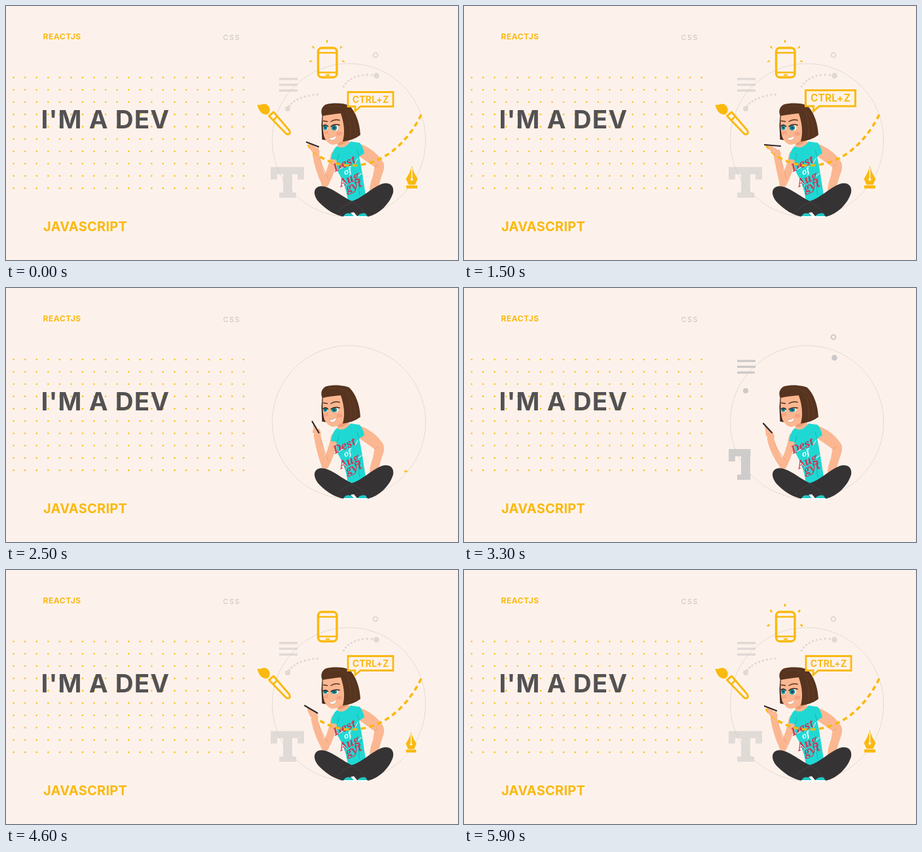
An HTML page that plays this animation: 690x388 px, repeating every 6 s.

```html
<!DOCTYPE html>
<html lang="en">
<head>
<meta charset="utf-8">
<title>I'm a dev</title>
<style>
html, body { margin: 0; width: 100%; height: 100%; overflow: hidden; background: #fdf2eb; }
svg { display: block; width: 100vw; height: 100vh; }
text { font-family: Inter, "Open Sans", sans-serif; font-weight: 700; }
.y { fill: #fab90f; }
.line { fill: none; stroke: #fab90f; stroke-width: 3.4; stroke-linejoin: round; }
.skin { fill: #fbb791; }
.limb { fill: none; stroke: #fbb791; stroke-linecap: round; stroke-linejoin: round; }
.thin { fill: none; stroke-linecap: round; }
.grey { fill: none; stroke: #cdc9c8; }
.script { font-family: "Noto Serif", serif; font-style: italic; font-size: 16.5px; fill: #cf3553; }
</style>
</head>
<body>
<svg viewBox="0 0 690 388" xmlns="http://www.w3.org/2000/svg">
  <defs><clipPath id="wipe"><rect id="wipeBox" x="400" y="240" width="60" height="60"/></clipPath></defs>
  <g id="grid" fill="#fac31c"></g>
  <text class="y" x="56.5" y="51" font-size="12" letter-spacing=".55">REACTJS</text>
  <text x="331.5" y="52" font-size="10.5" letter-spacing="1.8" fill="#c6c0bd" style="font-weight:400">CSS</text>
  <text x="53.5" y="187" font-size="38.5" letter-spacing="1.1" fill="#545153">I'M A DEV</text>
  <text class="y" x="57" y="343.7" font-size="20" letter-spacing=".25">JAVASCRIPT</text>

  <circle cx="523.5" cy="205" r="117" fill="none" stroke="#ccc5c2" stroke-width=".8" stroke-dasharray="2.5 1.2"/>

  <g id="greys">
    <circle id="ring" class="grey" cx="564" cy="75" r="3.4" stroke-width="2"/>
    <g id="bars" class="grey" stroke-width="3.4"></g>
    <g fill="#cdc9c8"><circle id="knobA" cx="430" cy="157"/><circle id="knobB" cx="565.5" cy="106.5"/></g>
    <g id="arcs" fill="#cdc9c8"></g>
    <path clip-path="url(#wipe)" fill="#cfcccc" d="M404 246H455V265H445V257H437V285H443V293H417V285H423V257H414V265H404Z"/>
  </g>

  <g id="phone">
    <rect class="line" x="476.500" y="64" width="28.5" height="45" rx="5.5"/>
    <path class="line" d="M477 71.5H504M477 101.5H504" style="stroke-width:2.4"/>
    <path class="line" d="M488 105.500H494" style="stroke-width:2.2"/>
  </g>
  <g id="rays" class="line"></g>

  <g id="brush">
    <path class="y" d="M383.5 150.5C389 153 391 148 397 150C403 153 405 160 400 165C394 168 386 163 383.5 150.5Z"/>
    <path class="line" d="M401.5 168L408.5 162L432.5 190Q435.5 197.5 428 195.5Z" style="stroke-width:3"/>
    <path class="line" d="M407 175L414.5 168.5" style="stroke-width:2.6"/>
  </g>

  <g id="nib">
    <path class="y" d="M619.5 244C622 253 625 259 628.5 264L624.5 273H614.5L610.5 264C614 259 617 253 619.5 244Z"/>
    <rect class="y" x="611" y="274" width="17" height="4.8"/>
    <path d="M619.5 247V264" stroke="#fdf2eb" stroke-width="1.6"/>
    <circle cx="619.5" cy="265" r="2" fill="#fdf2eb"/>
  </g>

  <g id="girl">
    <path class="skin" d="M541 211C556 216 568 226 576 239Q578.500 246 575.500 254Q570 268 567 286H555Q555 272 560 260L562.500 246L540 230Z"/>
    <path class="thin" stroke="#e99a74" stroke-width=".9" d="M563 246Q566 245 568 242"/>

    <path class="limb" stroke-width="11.500" d="M502 227Q497 252 487 271"/>
    <path id="forearm" class="limb" stroke-width="10.5"/>
    <path id="crease" class="thin" stroke="#e99a74" stroke-width=".8"/>

    <path class="skin" d="M505 200L520 198L526 212Q516 226 506 216Z"/>
    <path fill="#ea9d77" d="M506 207Q514 208 520 202L521 206Q514 214 507 212Z"/>
    <path fill="#20d8d3" d="M505 214Q515 221 526 207L540 209Q545 215 547 225L539 230C543 247 546 270 551 301H522C521 285 516 269 507 254C504 247 504 241 505 235L496 234Q498 220 505 214Z"/>
    <path class="thin" stroke="#14b5b4" stroke-width="1" d="M539 230Q537 223 536 220M543 258Q536 272 540 289M505 236Q508 231 508 226"/>
    <g text-anchor="middle">
      <text class="script" transform="translate(519 246) rotate(-24)">Dest</text>
      <text class="script" transform="translate(523 256) rotate(-24)" style="fill:#fff;font-size:12px">of</text>
      <text class="script" transform="translate(526 270) rotate(-24)">Aug</text>
      <text class="script" transform="translate(533 280) rotate(-24)">gyt</text>
    </g>
    <path class="thin" stroke="#fff" stroke-width="1" d="M508 250L515 246M533 240L537 233M515 268L520 273M537 260L543 256"/>

    <path fill="#363335" d="M528 298C512 291 493 273 479 275.500C468 278 469 290 478 300C489 311 502 320 517 322H552C570 318 586 302 591 285C593 273 584 268 573 272C556 279 543 294 528 298Z"/>
    <path class="thin" stroke="#454144" stroke-width="1" d="M528 299Q542 306 548 317M529 299Q512 306 506 315"/>
    <path fill="#20c9c7" d="M515 322Q518 315 526 317L533 322ZM535 322Q542 315 549 317L552 322Z"/>
    <path fill="#fff" d="M526 316L531 315L536 321H531ZM515 321H552V323H515Z"/>

    <path fill="#43261a" d="M483 162L481.500 182L482.500 204L490 205L489 178Z"/>
    <path class="skin" d="M484 163C483 178 483 192 486 201Q491 211 499 212C509 211 517 204 519 194L518 163Z"/>
    <path fill="#57341f" d="M483 168C479 160 483 153 488 150.500C499 147.500 515 148 524 152C534 162 540 178 541 197Q531 205 514 207C518 193 516 178 511 164C502 165 492 166 483 168Z"/>
    <path class="thin" stroke="#65402a" stroke-width=".9" d="M492 154Q509 151 519 158Q528 174 526 201M522 158Q533 172 534 198"/>
    <ellipse cx="509" cy="195" rx="4.500" ry="3" fill="#f58f77" opacity=".55"/>
    <ellipse cx="487" cy="194" rx="2.500" ry="2.500" fill="#f58f77" opacity=".45"/>
    <path class="thin" stroke="#58301f" stroke-width="1.500" d="M484.500 175.500L490.500 176.500M496 176.500Q502 172.500 509 174.500"/>
    <path class="thin" stroke="#e59373" stroke-width="1" d="M491 190Q489 195 492 195.500"/>
    <path fill="#fff" stroke="#d98770" stroke-width=".5" d="M493 201.500Q499 202 504.500 198Q503.500 205 498 205Q494.500 204.500 493 201.500Z"/>
    <g id="eyeballs">
      <ellipse cx="488" cy="185.500" rx="3.600" ry="4.300" fill="#fff"/>
      <ellipse cx="502" cy="186" rx="5.400" ry="4.600" fill="#fff"/>
      <ellipse cx="487.500" cy="185.500" rx="3.100" ry="4" fill="#1c8f98"/>
      <ellipse cx="501" cy="186" rx="4.300" ry="4.300" fill="#1c8f98"/>
      <circle cx="487.500" cy="185.500" r="1.500" fill="#174a56"/>
      <circle cx="501" cy="186" r="2" fill="#174a56"/>
    </g>
    <path id="lids" class="thin" stroke="#3a221b" stroke-width="1.500"/>
  </g>

  <path id="swing" class="line" stroke-dasharray="7.5 5.5" style="stroke-width:3.6"/>

  <path id="fingers" class="limb" stroke-width="4"/>
  <path id="pen" class="thin" stroke="#302a2c" stroke-width="2.2"/>

  <g id="bubble">
    <path d="M522 131.500H591V153.500H541L533 160.500V153.500H522Z" fill="#fdf2eb" stroke="#fab90f" stroke-width="2.8"/>
    <text class="y" x="528.800" y="147.600" font-size="14" letter-spacing=".15">CTRL+Z</text>
  </g>
</svg>
<script>
const LOOP = 6000, STEP = 100;
const $ = id => document.getElementById(id);
const clamp = v => Math.max(0, Math.min(1, v));
const mix = (a, b, u) => a + (b - a) * u;
const smooth = u => u * u * (3 - 2 * u);
const backIn = u => 2.7 * u ** 3 - 1.7 * u * u;
const backOut = u => 1 - backIn(1 - u);
const put = (id, attrs) => { for (const k in attrs) $(id).setAttribute(k, attrs[k]); };
const visible = on => on ? "visible" : "hidden";

// Leaves at `out`, comes back at `enter`; the loop starts fully shown.
function shown(t, enter, inDur, out, outDur, back = true) {
  const leaving = t < out + outDur;
  const u = leaving ? clamp((t - out) / outDur) : clamp((t - enter) / inDur);
  if (leaving) return 1 - (back ? backIn(u) : smooth(u));
  return back ? backOut(u) : smooth(u);
}

function scale(id, s, x, y, turn = 0) {
  put(id, {
    transform: `translate(${x} ${y}) rotate(${turn}) scale(${s}) translate(${-x} ${-y})`,
    visibility: visible(s > 0.01)
  });
}

// time, pen tip x y, pen tail x y, hand x y
const POSES = [
  [0, 459, 208, 477, 215, 468, 214],
  [1500, 459, 212, 483, 214, 473, 217],
  [2500, 467.5, 204, 477.5, 221, 470, 213],
  [3300, 457, 207, 470, 221, 463, 218],
  [4200, 457, 206, 472, 221, 465, 216],
  [5100, 455, 209, 480, 215, 467, 215],
  [5900, 459, 208, 477, 215, 468, 214],
  [6000, 459, 208, 477, 215, 468, 214]
];
const EYES = [[0, 1], [1500, 1], [2500, .8], [3300, .75], [4200, .65], [4900, .75],
  [5000, .3], [5100, 0], [5200, .3], [5300, 1], [6000, 1]];

function keyed(keys, t) {
  const i = Math.max(1, keys.findIndex(k => k[0] > t));
  const a = keys[i - 1], b = keys[i];
  const u = smooth((t - a[0]) / (b[0] - a[0]));
  return a.slice(1).map((v, j) => mix(v, b[j + 1], u));
}

const bezier = (p, u) => [0, 1].map(i => {
  const v = 1 - u;
  return v ** 3 * p[0][i] + 3 * v * v * u * p[1][i] + 3 * v * u * u * p[2][i] + u ** 3 * p[3][i];
});

const ARCS = [
  [[430, 157], [437, 142], [460, 135], [482, 135]],
  [[513, 128], [520, 110], [540, 102], [566, 106]]
];
const SWING = [[460, 210], [479, 248], [578, 276], [634, 166]];

let dots = "";
for (let r = 0; r < 10; r++)
  for (let c = 0; c < 21; c++)
    dots += `<circle cx="${11.7 + c * 17.55}" cy="${109.2 + r * 18.8}" r="1.3"/>`;
$("grid").innerHTML = dots;

function drawGreys(t) {
  const part = (enter, out, back) => clamp(shown(t, enter, 450, out, 400, back));
  const ring = part(2800, 1900);
  put("ring", { r: 3.4 * ring, visibility: visible(ring > .01) });
  put("knobA", { r: 4 * part(2800, 1800) });
  put("knobB", { r: 4.4 * part(2800, 1800) });
  $("bars").innerHTML = [0, 1, 2].map(i => {
    const w = 28 * part(2750 + i * 80, 1600 + i * 80, false);
    return w > .1 ? `<path d="M417 ${111.5 + i * 8.8}h${w}"/>` : "";
  }).join("");
  const sweep = shown(t, 3350, 600, 1600, 500, false);
  $("arcs").innerHTML = ARCS.map((arc, k) => {
    let s = "";
    for (let i = 0; i <= 10; i++) {
      const u = i / 10;
      if ((k ? 1 - u : u) >= sweep) continue;
      const [x, y] = bezier(arc, u);
      s += `<circle cx="${x}" cy="${y}" r="1.7"/>`;
    }
    return s;
  }).join("");
  put("wipeBox", { width: 60 * shown(t, 2950, 600, 1700, 500, false) });
  put("greys", { opacity: t > 2500 ? mix(1, .6, clamp((t - 3500) / 500)) : .6 });
}

function drawRays(t) {
  put("rays", { visibility: visible(t >= 5800 || t < 1600) });
  const beat = Math.max(0, Math.sin((t - 5800) / 800 * 2 * Math.PI)) ** 3;
  const d = [[490, 54, -90], [469, 63, -130], [511.5, 63, -50], [465, 84.5, 150], [515, 84.5, 30]]
    .map(([x, y, deg]) => {
      const a = deg * Math.PI / 180, c = Math.cos(a), s = Math.sin(a);
      const at = r => `${x + c * r} ${y + s * r}`;
      return `M${at(beat - 2)}L${at(beat + 2)}`;
    }).join("");
  $("rays").innerHTML = `<path d="${d}" style="stroke-width:${2 + 2 * beat}"/>`;
}

function drawArm(t) {
  const [px, py, qx, qy, hx, hy] = keyed(POSES, t);
  put("forearm", { d: `M487 271Q${hx + 9} 250 ${hx + 5} ${hy + 12}` });
  put("crease", { d: `M492 264Q${hx + 16} 250 ${hx + 11} ${hy + 18}` });
  put("pen", { d: `M${px} ${py}L${qx} ${qy}` });
  const mx = mix(px, qx, .3), my = mix(py, qy, .3);
  put("fingers", {
    d: `M${hx + 6} ${hy + 11}L${hx + 3} ${hy + 3}L${mx} ${my + 2}` +
       `M${hx + 7} ${hy + 8}L${hx} ${hy + 7}L${mx + 1} ${my + 5}M${hx + 9} ${hy + 9}L${hx + 7} ${hy + 4}`
  });
}

function drawEyes(t) {
  const [open] = keyed(EYES, t);
  put("eyeballs", {
    transform: `translate(0 ${187 * (1 - open)}) scale(1 ${open})`,
    visibility: visible(open > .1)
  });
  const y = 187 - 5 * open, bend = open > .2 ? -2.5 * open : 2;
  put("lids", { d: `M484 ${y + 1.5}Q488 ${y + bend} 491.5 ${y + 2}M496 ${y + 2}Q501 ${y + bend} 509 ${y}` });
}

function drawSwing(t) {
  const u = shown(t, 3500, 600, 1650, 600, false);
  let d = "";
  for (let i = 40; i >= 0; i--)
    d += (d ? "L" : "M") + bezier(SWING, u * i / 40).map(v => v.toFixed(2)).join(" ");
  put("swing", { d, visibility: visible(u > .01) });
}

function draw(t) {
  drawGreys(t);
  drawRays(t);
  drawArm(t);
  drawEyes(t);
  drawSwing(t);
  scale("phone", shown(t, 3600, 500, 1600, 500), 490.5, 86);
  scale("brush", shown(t, 3950, 450, 1650, 500), 434, 198);
  scale("bubble", shown(t, 3800, 500, 1300, 500), 527, 159);
  const nib = shown(t, 4450, 500, 2050, 470);
  scale("nib", nib, 608, 278, t < 2600 ? 90 * clamp((t - 2050) / 470) : 0);
}

function tick(now) {
  draw(Math.floor(now % LOOP / STEP) * STEP);
  requestAnimationFrame(tick);
}
draw(0);
requestAnimationFrame(tick);
</script>
</body>
</html>
```
